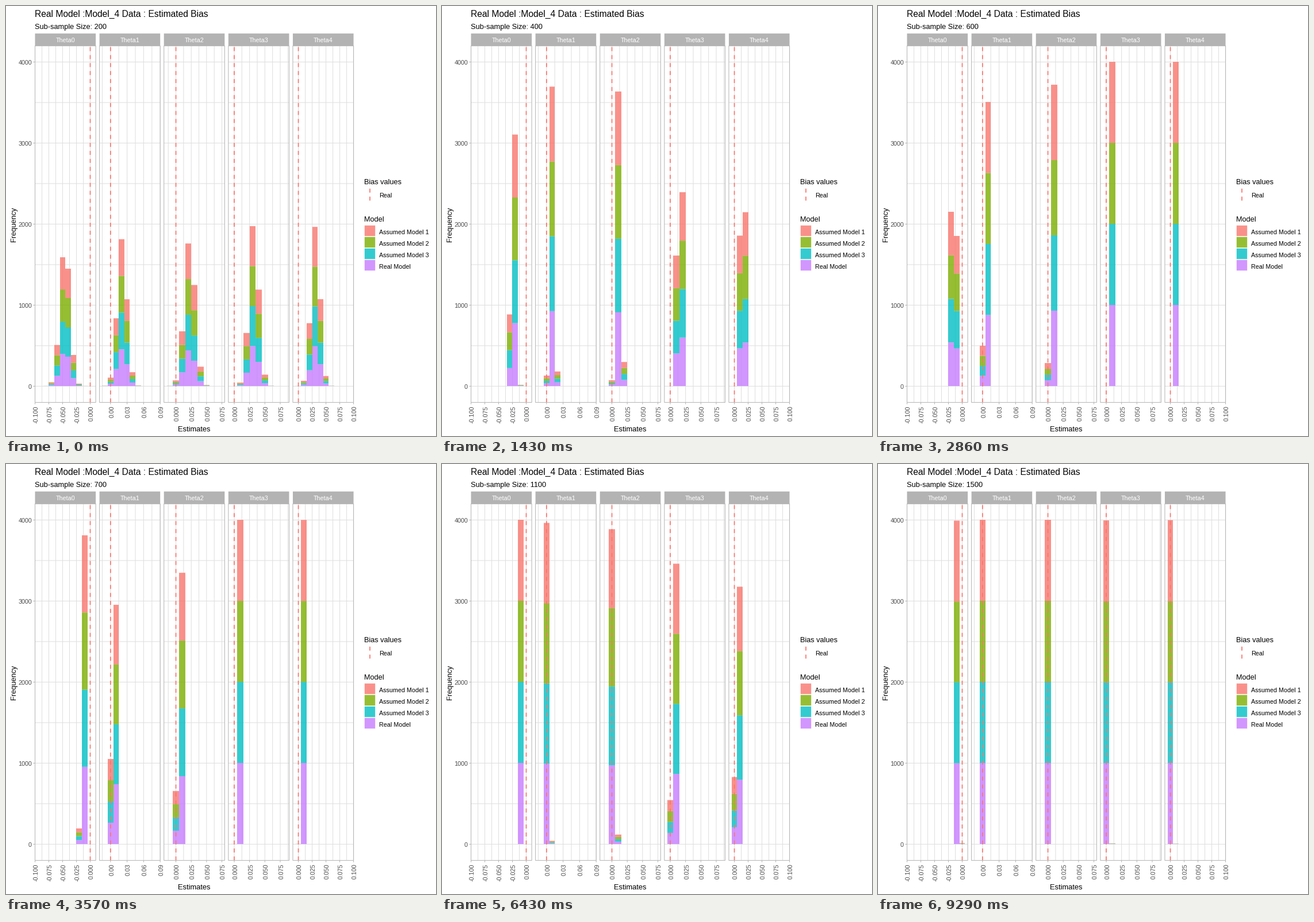
Write a matplotlib script that moves like this. It is 748 px wide and 748 px high and loops after 10000 ms.

```python
import math

import matplotlib.pyplot as plt
from matplotlib.animation import FuncAnimation
from matplotlib.collections import LineCollection, PolyCollection
from matplotlib.patches import Rectangle

SIDE, DPI = 748, 100
PT = 72 / DPI
LOOP, FRAMES, STATES = 10000, 100, 14
BIN, TOTAL = 0.01, 4000
TOP, BOTTOM = 69.3, 689.6
LEFT, WIDTH, PITCH = 50.5, 105.6, 112.12
COLORS = ["#C77CFF", "#00BFC4", "#7CAE00", "#F8766D"]
MODELS = ["Real Model", "Assumed Model 3", "Assumed Model 2", "Assumed Model 1"]
GRID, FRAME, TICK_TEXT, RED = "#DEDEDE", "#B3B3B3", "#4D4D4D", "#F8766D"

plt.rcParams["font.family"] = "Liberation Sans"
fig = plt.figure(figsize=(SIDE / DPI, SIDE / DPI), dpi=DPI, facecolor="white")
ax = fig.add_axes([0, 0, 1, 1])
ax.set_xlim(0, SIDE)
ax.set_ylim(SIDE, 0)
ax.axis("off")


def y_of(count):
    return 661.4 - 0.141 * count


def below(z):
    return 0.5 * (1 + math.erf(z / math.sqrt(2)))


class Panel:
    """Facet over bins lo..hi; its estimates are normal around a bias ~ 1/n."""

    def __init__(self, index, lo, hi, step, digits, bias, drift, spread):
        self.name = f"Theta{index}"
        self.left = LEFT + PITCH * index
        self.right = self.left + WIDTH
        self.lo, self.hi = lo, hi
        self.step, self.digits = step, digits
        self.bias, self.drift, self.spread = bias, drift, spread
        # bin range widened by 5% on either side
        span = (hi - lo + 1) * BIN
        self.start = (lo - 0.5) * BIN - 0.05 * span
        self.scale = WIDTH / (1.1 * span)

    def x(self, value):
        return self.left + (value - self.start) * self.scale

    def ticks(self, step):
        ks = range(-20, 21)
        return [k * step for k in ks
                if self.left - 0.5 < self.x(k * step) < self.right + 0.5]

    def counts(self, size):
        ratio = 200 / size
        mean = (self.bias + math.copysign(self.drift, self.bias) * ratio ** 0.5) / size
        sd = self.spread * ratio ** 0.55 / size
        for k in range(self.lo, self.hi + 1):
            a, b = (below(((k + d) * BIN - mean) / sd) for d in (-0.5, 0.5))
            yield k, round(TOTAL * (b - a))


PANELS = [
    Panel(0, -9, 0, 0.025, 3, -9.0, 0.15, 1.70),
    Panel(1, -1, 8, 0.03, 2, 3.84, 0.35, 1.65),
    Panel(2, -1, 7, 0.025, 3, 4.13, 0.34, 1.65),
    Panel(3, 0, 8, 0.025, 3, 5.95, 0.42, 1.46),
    Panel(4, 0, 9, 0.025, 3, 5.81, 0.40, 1.50),
]


def lines(segments, color, z=1, width=1):
    ax.add_collection(LineCollection(segments, colors=color, linewidths=width * PT,
                                     zorder=z, snap=False, capstyle="butt"),
                      autolim=False)


def dashes(x, bottom, top, dash=6.945):
    """Dash and gap of equal length, counted upwards from the bottom."""
    n = math.ceil((bottom - top) / (2 * dash))
    starts = [bottom - 2 * dash * k for k in range(n)]
    return [((x, y), (x, max(y - dash, top))) for y in starts]


def box(x, y, w, h, **kw):
    ax.add_patch(Rectangle((x, y), w, h, snap=False, **kw))


def text(x, y, s, px, color="black", **kw):
    return ax.text(x, y, s, fontsize=px * PT, color=color, va="baseline", **kw)


def upright(x, y, s, px, color="black", ha="center"):
    text(x, y, s, px, color, ha=ha, rotation=90, rotation_mode="anchor")


grid, ticks, reds = [], [], dashes(633, 338.5, 317.5)
for p in PANELS:
    for count in range(0, TOTAL + 1, 500):
        grid.append(((p.left, y_of(count)), (p.right, y_of(count))))
    for v in p.ticks(p.step / 2):
        grid.append(((p.x(v), TOP), (p.x(v), BOTTOM)))
    for v in p.ticks(p.step):
        ticks.append(((p.x(v), BOTTOM), (p.x(v), BOTTOM + 3.2)))
        upright(p.x(v) + 5.5, 695.7, f"{v:.{p.digits}f}", 10.7, TICK_TEXT, "right")
    reds += dashes(p.x(0), BOTTOM, TOP)
    box(p.left, TOP, WIDTH, BOTTOM - TOP, fill=False, ec=FRAME, lw=PT, zorder=5)
    box(p.left, 47.8, WIDTH, TOP - 47.8, fc=FRAME, ec="none", zorder=5)
    text((p.left + p.right) / 2, 63, p.name, 10.7, "white", ha="center", zorder=6)

for count in range(0, TOTAL + 1, 1000):
    ticks.append(((47.3, y_of(count)), (LEFT, y_of(count))))
    text(45, y_of(count) + 4.3, str(count), 10.7, TICK_TEXT, ha="right")

lines(grid, GRID)
lines(ticks, FRAME)
lines(reds, RED, z=4, width=1.74)

text(50, 19, "Real Model :Model_4 Data : Estimated Bias", 15.65)
subtitle = text(50, 40, "", 12.75)
text(327.5, 740, "Estimates", 12.9, ha="center")
upright(17.3, 379.5, "Frequency", 12.75)

text(623, 310, "Bias values", 12.75)
text(649, 333, "Real", 10.75)
text(623, 375, "Model", 12.75)
for i, (color, model) in enumerate(zip(COLORS[::-1], MODELS[::-1])):
    box(623.8, 381.8 + 20 * i, 18.4, 18.4, fc=color, ec="none", alpha=0.8)
    text(649, 397 + 20 * i, model, 10.75)

layers = []
for color in COLORS:
    layer = PolyCollection([], facecolors=color, edgecolors="none",
                           alpha=0.8, zorder=3, snap=False)
    ax.add_collection(layer, autolim=False)
    layers.append(layer)


def bars(size, part):
    """Quarter number `part` of every stacked bar, counted from the bottom."""
    quads = []
    for p in PANELS:
        for k, count in p.counts(size):
            if count:
                x0, x1 = (round(p.x((k + d) * BIN)) for d in (-0.5, 0.5))
                a, b = (y_of(count * q / 4) - 0.4 for q in (part, part + 1))
                quads.append([(x0, a), (x1, a), (x1, b), (x0, b)])
    return quads


def update(i):
    # each state begins on the last tick before its moment
    step = LOOP / FRAMES
    state = int((i + 0.9) * step * STATES / LOOP)
    size = 200 + 100 * state
    subtitle.set_text(f"Sub-sample Size: {size}")
    for part, layer in enumerate(layers):
        layer.set_verts(bars(size, part))
    return [subtitle, *layers]


anim = FuncAnimation(fig, update, frames=FRAMES, interval=LOOP // FRAMES,
                     repeat=True, repeat_delay=0, blit=False)
plt.show()
```
